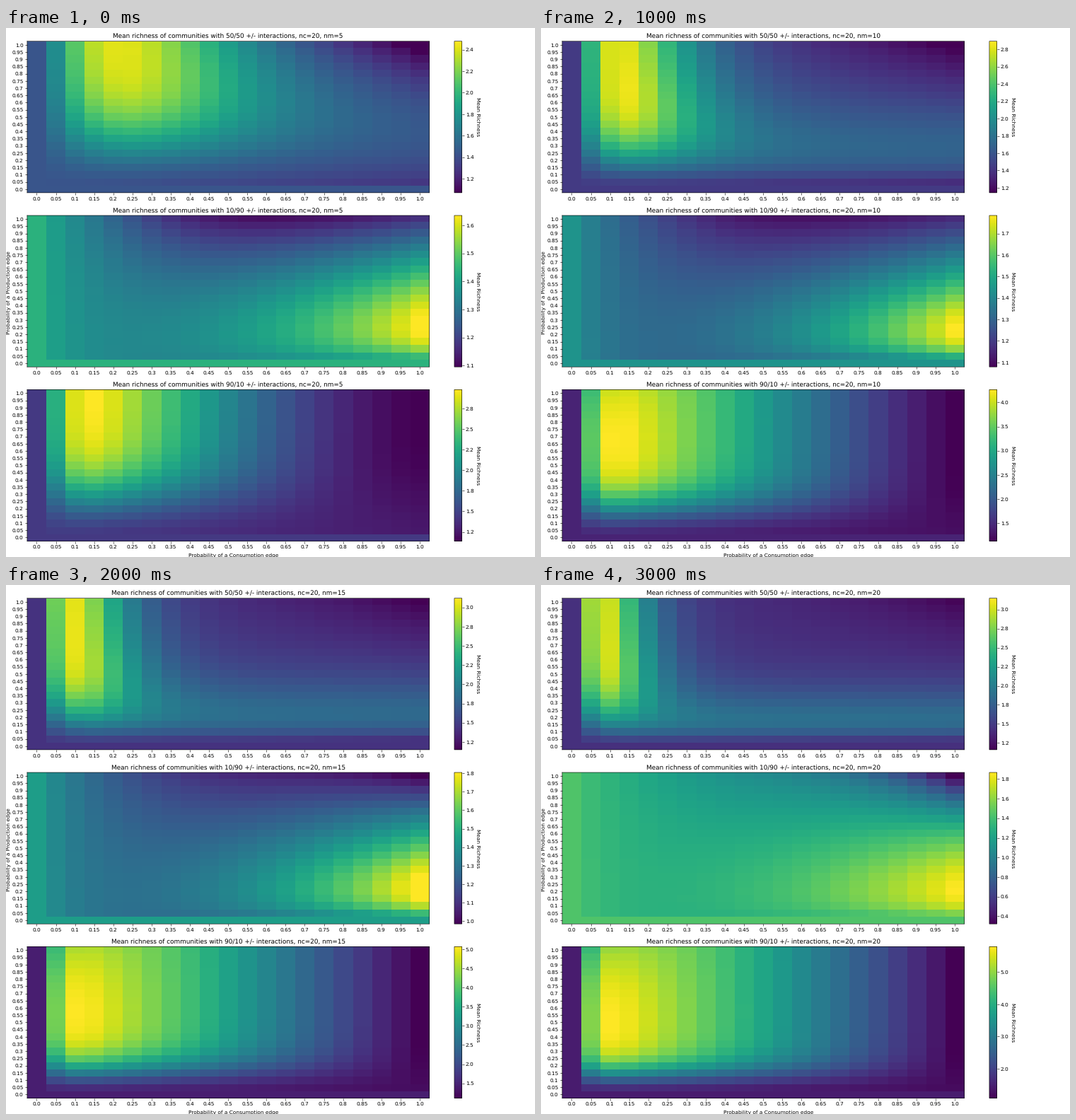
A matplotlib script that plays this animation: 748 by 748 pixels, repeating every 4 s.

```python
import numpy as np
import matplotlib.pyplot as plt
from matplotlib.animation import FuncAnimation

SIZE, INCHES = 748, 14
plt.rcParams.update({"font.family": "DejaVu Sans", "font.size": 10,
                     "text.hinting": "none", "path.snap": False})

BASE_RICHNESS = 1.44          # no consumption or no production edges
RESOURCES = [5, 10, 15, 20]
STEPS = np.linspace(0, 1, 21)
C, P = np.meshgrid(STEPS, STEPS)   # consumption and production probability


def bump(x, peak, power=1):
    """Skewed hill that reaches 1 at the peak and has a long right tail."""
    return (x / peak * np.exp(1 - x / peak)) ** power


def saturate(x, scale, power=1):
    return 1 - np.exp(-(x / scale) ** power)


# Each rule gives richness as a fraction of its range, for nm resources.

def balanced(nm, base):
    floor = base * (1 - 0.5 * C * np.exp(-P / 0.2))
    peak_at = (0.03 + 0.95 / nm) * (1.2 - 0.2 * P)
    peak = bump(C, peak_at, 1.6) * saturate(P, 0.27 + 0.9 / nm, 2)
    shoulder = bump(P, 0.08 + 2 / nm, 2) * saturate(C, 0.1)
    sink = C ** 2.5 * P ** 3
    return (floor + (0.96 - base) * peak + (0.32 - 1.45 / nm) * shoulder
            - (0.05 + 1.5 / nm) * sink)


def mostly_negative(nm, base):
    drop, dip, lobe, corner = {5: (0.2, 0.46, 0.6, 0),
                               10: (0.2, 0.31, 0.7, 0),
                               15: (0.22, 0.25, 0.72, 0.2),
                               20: (0.1, 0.15, 0.38, 0.55)}[nm]
    return (base - drop * saturate(C, 0.1)
            - dip * saturate(C, 0.33, 2) * P ** 2.2
            + lobe * C ** 2.5 * bump(P, 0.2 + 0.4 / nm)
            - corner * C ** 5 * P ** 4)


def mostly_positive(nm, base):
    floor = base * (1.1 - 0.7 * C)
    ridge = (1 - C) ** (0.75 + 4.2 / nm) * saturate(C, 0.03 + 0.18 / nm, 1.3)
    ridge /= ridge.max()
    overshoot = np.maximum(P - 0.35 - 3 / nm, 0) ** 2
    ridge *= 1 - 0.7 * overshoot * np.exp(-(C / 0.25) ** 2)
    return floor + (ridge - floor) * saturate(P, 0.85 / nm ** 0.5, 2)


# Mix, rule, and the colour range for each resource count.
PANELS = [
    ("50/50", balanced,
     [(1.069, 2.479), (1.143, 2.894), (1.149, 3.119), (1.162, 3.148)]),
    ("10/90", mostly_negative,
     [(1.095, 1.635), (1.079, 1.784), (0.985, 1.804), (0.321, 1.868)]),
    ("90/10", mostly_positive,
     [(1.138, 2.978), (1.126, 4.264), (1.111, 5.074), (1.088, 5.790)]),
]


def richness(rule, nm, low, high):
    base = (BASE_RICHNESS - low) / (high - low)
    level = np.where((C == 0) | (P == 0), base, rule(nm, base))
    return low + (high - low) * np.clip(level, 0, 1)


fig, axes = plt.subplots(3, 1, figsize=(INCHES, INCHES), dpi=SIZE / INCHES,
                         facecolor="white")
fig.subplots_adjust(left=0.04, right=0.99, bottom=0.03, top=0.975, hspace=0.15)

names = [str(round(step, 2)) for step in STEPS]
images = []
for ax in axes:
    image = ax.imshow(np.zeros_like(C), cmap="viridis", origin="lower",
                      aspect="auto", interpolation="nearest", vmin=0, vmax=1)
    ax.set_xticks(range(len(names)), names)
    ax.set_yticks(range(len(names)), names)
    bar = fig.colorbar(image, ax=ax, format="%.1f")
    bar.set_label("Mean Richness", rotation=270, labelpad=12)
    images.append(image)

fig.text(0.43, 0, "Probability of a Consumption edge", ha="center")
fig.text(0, 0.5, "Probability of a Production edge", va="center",
         rotation="vertical")


def update(frame):
    nm = RESOURCES[frame]
    for ax, image, (mix, rule, ranges) in zip(axes, images, PANELS):
        low, high = ranges[frame]
        image.set_data(richness(rule, nm, low, high))
        image.set_clim(low, high)
        ax.set_title(f"Mean richness of communities with {mix} +/- "
                     f"interactions, nc=20, nm={nm}", fontsize=12)
    return []


animation = FuncAnimation(fig, update, frames=len(RESOURCES), interval=1000,
                          repeat=True, repeat_delay=0)
plt.show()
```
